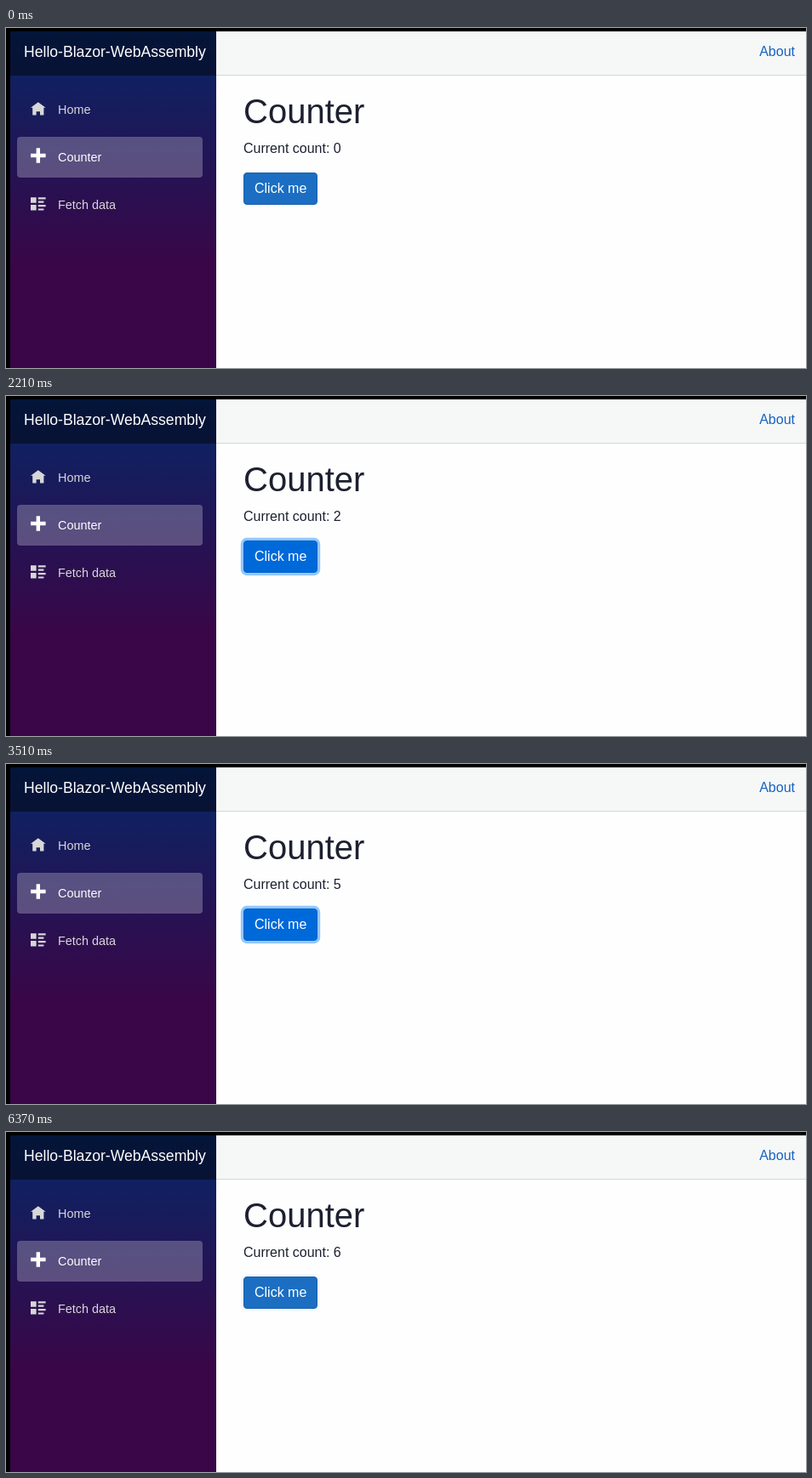
Write an HTML page that moves like this. It is 940 px wide and 400 px high and loops after 6.5 s.

```html
<!DOCTYPE html>
<html lang="en">
<head>
<meta charset="utf-8">
<title>Counter</title>
<style>
  html, body { margin: 0; width: 100%; height: 100%; overflow: hidden; background: #000; }
  svg { display: block; width: 940px; height: 400px; font-family: "Liberation Sans", Arial, sans-serif; }
  .nav { font-size: 14.4px; fill: #d7d7d7; }
  .nav .active { fill: #fff; }
  .body { font-size: 16px; fill: #1d2030; }
</style>
</head>
<body>
<svg viewBox="0 0 940 400">
  <defs>
    <linearGradient id="side" gradientUnits="userSpaceOnUse" x1="0" y1="0" x2="0" y2="400">
      <stop offset="0" stop-color="#052767"/>
      <stop offset=".7" stop-color="#3a0647"/>
    </linearGradient>
  </defs>

  <rect x="247" width="693" height="400" fill="#fefefe"/>
  <rect x="247" width="693" height="55" fill="#f6f7f7"/>
  <rect x="247" y="55" width="693" height="1" fill="#d6d5d5"/>
  <rect width="247" height="400" fill="url(#side)"/>
  <rect width="247" height="56" fill="#000" fill-opacity=".45"/>
  <rect x="13" y="128" width="218" height="48" rx="4" fill="#fff" fill-opacity=".25"/>
  <path d="M0 0H940V4H5V400H0Z"/>

  <text x="21" y="34" font-size="17.6" fill="#fff">Hello-Blazor-WebAssembly</text>
  <g class="nav">
    <path transform="translate(29 87.2) scale(2.2)" d="M4 0L0 3h1v4h2V5h2v2h2V3h1z"/>
    <text x="61" y="101">Home</text>
    <g class="active">
      <path transform="translate(29 141.2) scale(2.2)" d="M3 0v3H0v2h3v3h2V5h3V3H5V0z"/>
      <text x="61" y="157">Counter</text>
    </g>
    <path transform="translate(29 199.2) scale(2.2)"
      d="M0 0h3v3H0zM4 0h4v1H4zM4 2h3v1H4zM0 4h3v3H0zM4 4h4v1H4zM4 6h3v1H4z"/>
    <text x="61" y="213">Fetch data</text>
  </g>

  <g class="body">
    <text x="885.2" y="33" fill="#1463c4">About</text>
    <text x="279" y="112" font-size="40">Counter</text>
    <text id="count" x="279" y="147">Current count: 0</text>
    <rect id="ring" x="275.8" y="166.8" width="93.4" height="44.4" rx="7.2" fill="#92c7ff"/>
    <rect id="button" x="279.5" y="170.5" width="86" height="37" rx="3.5"/>
    <text x="292" y="194" fill="#fff">Click me</text>
  </g>
</svg>
<script>
  const LOOP = 6500;
  const byId = id => document.getElementById(id);
  const count = byId("count"), ring = byId("ring"), button = byId("button");

  // Button looks as [fill, border]
  const IDLE = ["#1b6ec2", "#1861ac"];
  const FADING = ["#0a6bd0", "#0862c0"];
  const HOVER = ["#0069d9", "#0062cc"];
  const PRESSING = ["#0065d2", "#005fc5"];
  const PRESSED = ["#0062cc", "#005cbf"];

  // Start time, look, focus ring opacity, clicks so far
  const STEPS = [
    [0, IDLE, 0, 0],
    [910, FADING, 0, 0],
    [1040, HOVER, 0, 0],
    [1300, PRESSING, .6, 0],
    [1430, PRESSED, 1, 0],
    [1560, HOVER, 1, 1],
    [1950, PRESSING, 1, 1],
    [2080, PRESSED, 1, 1],
    [2210, HOVER, 1, 2],
    [2340, PRESSING, 1, 2],
    [2470, PRESSED, 1, 2],
    [2600, HOVER, 1, 3],
    [2860, PRESSED, 1, 3],
    [2990, HOVER, 1, 4],
    [3380, PRESSED, 1, 4],
    [3510, HOVER, 1, 5],
    [4420, PRESSED, 1, 5],
    [4550, HOVER, 1, 6],
    [4940, FADING, 1, 6],
    [5070, IDLE, 1, 6],
    [6370, IDLE, .08, 6]
  ];

  function draw(time) {
    const [, look, focus, clicks] = STEPS.findLast(([start]) => start <= time);
    button.setAttribute("fill", look[0]);
    button.setAttribute("stroke", look[1]);
    ring.setAttribute("opacity", focus);
    count.textContent = "Current count: " + clicks;
  }

  const begin = performance.now();
  function tick() {
    draw((performance.now() - begin) % LOOP);
    requestAnimationFrame(tick);
  }
  tick();
</script>
</body>
</html>
```
